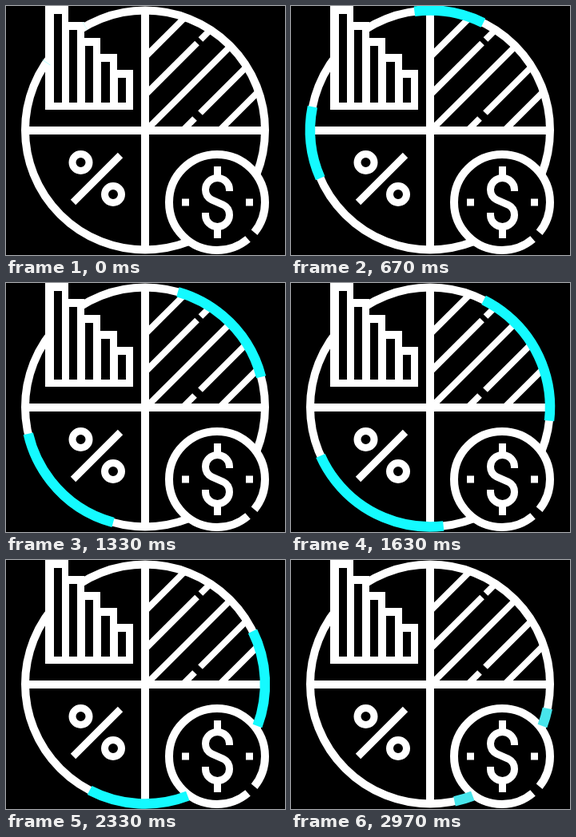
These frames come from a looping animation (349x312 px, 3.01 s). An HTML page:

```html
<!DOCTYPE html>
<html lang="en">
<head>
<meta charset="utf-8">
<title>Pie chart icon</title>
<style>
  html, body { margin: 0; width: 100%; height: 100%; overflow: hidden; background: #000; }
  svg { display: block; width: 349px; height: 312px; }
  .line { fill: none; stroke: #fff; stroke-width: 9; }
  .hatch { stroke-width: 8; }
  .ring { stroke-width: 10; }
  .solid { fill: #fff; }
  .hole { fill: #000; }

  /* dash pattern: 0, start, length, rest (percent of the path) */
  .sweep {
    fill: none;
    stroke: #14faff;
    stroke-width: 12.5;
    stroke-dasharray: 0 0 0 200;
    animation: sweep 3010ms linear infinite;
  }
  @keyframes sweep {
    0%     { stroke-dasharray: 0 0 0 200; }
    22.26% { stroke-dasharray: 0 16 24 200; }
    35.55% { stroke-dasharray: 0 26 36 200; }
    54.15% { stroke-dasharray: 0 40.2 49.8 200; }
    60.8%  { stroke-dasharray: 0 46.4 53.6 200; }
    68.77% { stroke-dasharray: 0 55.2 44.8 200; }
    77.41% { stroke-dasharray: 0 66.7 33.3 200; }
    92%    { stroke-dasharray: 0 85.2 14.8 200; stroke: #14faff; }
    98.67% { stroke-dasharray: 0 93.7 6.3 200; stroke: #48e5eb; }
    100%   { stroke-dasharray: 0 95.4 4.6 200; stroke: #48e5eb; }
  }
</style>
</head>
<body>
<svg viewBox="0 0 349 312">
  <clipPath id="quarter"><path d="M174 156V4A151 151 0 0 1 325 156Z"/></clipPath>

  <!-- pie -->
  <circle class="line ring" cx="174" cy="155.5" r="150"/>
  <path class="line ring" d="M174 4V308M24 156H324"/>
  <path class="line hatch" clip-path="url(#quarter)"
    d="M170 68L238 0M170 115.500L239 46.500M243.500 42L256 29.500M170 161L296 35
       M214 163L236 141M243 134L315 62M258 165L340 83"/>

  <!-- bars -->
  <path class="solid" d="M49 0H78V20H98V40H118V60H139V80H159V130H49Z"/>
  <path class="hole" d="M60 10H70V121H60ZM79 30H89V121H79ZM99 50H109V121H99Z
    M119 70H130V121H119ZM140 90H150V121H140Z"/>

  <!-- percent -->
  <g class="line">
    <circle cx="93.500" cy="196" r="10.500"/>
    <circle cx="134" cy="236" r="10.500"/>
    <path d="M84 246L143 187"/>
  </g>

  <!-- coin -->
  <circle class="hole" cx="264" cy="246" r="60"/>
  <circle class="line ring" cx="264" cy="246" r="60" pathLength="360" stroke-dasharray="39 11 310 0"/>
  <path class="line" d="M264.500 201V215M264.500 277V291M279.500 232V230A15 14.500 0 0 0 249.500 230
    Q249.500 239 257.500 243L271.500 249Q279.500 253 279.500 262A15 14.500 0 0 1 249.500 262V259"/>
  <path class="solid" d="M220 241.500h9v9h-9zM300 241.500h9v9h-9z"/>

  <!-- moving highlights -->
  <path class="sweep" pathLength="100" d="M99 25.600A150 150 0 0 1 314.500 208"/>
  <path class="sweep" pathLength="100" d="M50.400 70.500A150 150 0 0 0 227.300 295.700"/>
</svg>
</body>
</html>
```
